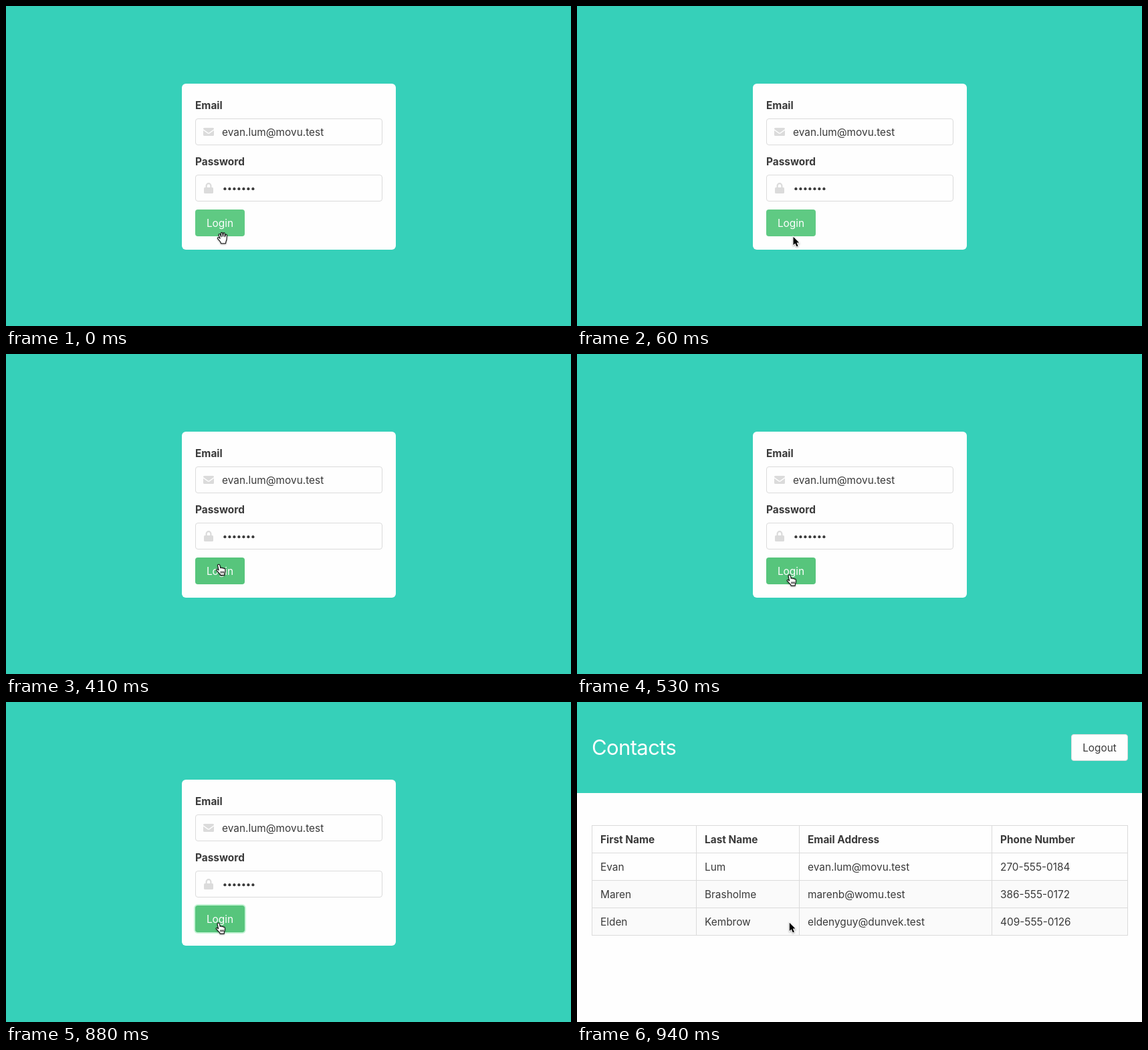
An HTML page that plays this animation: 845 px wide and 478 px high, repeating every 2410 ms.

```html
<!DOCTYPE html>
<html lang="en">
<head>
<meta charset="utf-8">
<title>Login and contacts</title>
<style>
  html, body { margin: 0; width: 100%; height: 100%; overflow: hidden; background: #fefefe; }
  svg { display: block; width: 100%; height: 100%; }
  text { font-family: Inter, Roboto, "Liberation Sans", sans-serif; font-size: 15.4px; fill: #3a3a3a; }
  .bold { font-weight: 700; }
  .mid { text-anchor: middle; }
  .title { font-size: 31px; letter-spacing: -.02em; fill: #fefefe; }
  .box { fill: #fefefe; stroke: #dbdbdb; }
  .icon { fill: #dbdbdb; }
  .hand { fill: #fff; stroke: #111; stroke-width: 1.1; stroke-linejoin: round; }
  .cursor { filter: drop-shadow(0 1px 1px rgba(0, 0, 0, .35)); }
</style>
</head>
<body>
<svg viewBox="0 0 845 478">
  <g id="login">
    <rect width="845" height="478" fill="#36d0b9"/>
    <rect x="263" y="116" width="320" height="248" rx="6" fill="#fefefe"/>
    <text class="bold" x="283" y="154">Email</text>
    <rect class="box" x="283.5" y="168.5" width="279" height="39" rx="3.5"/>
    <path class="icon" d="M296.5 182h13q1.5 0 1.5 1.5v.6l-7 5q-1 .7-2 0l-7-5v-.6q0-1.500 1.500-1.500z
      M295 185.700l6.600 4.700q1.400.9 2.800 0l6.600-4.700v6.800q0 1.500-1.500 1.500h-13q-1.500 0-1.500-1.500z"/>
    <text x="323" y="194">evan.lum@movu.test</text>
    <text class="bold" x="283" y="238">Password</text>
    <rect class="box" x="283.5" y="252.5" width="279" height="39" rx="3.5"/>
    <rect class="icon" x="296" y="271" width="14" height="9" rx="1.5"/>
    <path d="M299.600 272v-3.200a3.400 3.600 0 0 1 6.800 0v3.200" fill="none" stroke="#dbdbdb" stroke-width="2.2"/>
    <g id="dots" fill="#3a3a3a"></g>
    <rect id="ring" x="281" y="302" width="78" height="44" rx="6" fill="#23d160" fill-opacity=".25"/>
    <rect id="button" x="283" y="304" width="74" height="40" rx="4"/>
    <text class="mid" x="320" y="330" style="fill:#fefefe">Login</text>
  </g>
  <g id="contacts">
    <rect width="845" height="478" fill="#fefefe"/>
    <rect width="845" height="136" fill="#36d0b9"/>
    <text class="title" x="22" y="78.500">Contacts</text>
    <rect class="box" x="739.5" y="48.5" width="84" height="39" rx="3.5"/>
    <text class="mid" x="781.5" y="74">Logout</text>
    <g id="table"></g>
  </g>
  <g id="arrow" class="cursor">
    <path d="M0 0V12.200L2.800 9.600L5 14.500L7.100 13.600L5 8.800H8.700Z" fill="#000" stroke="#fff" stroke-width="1.6" paint-order="stroke"/>
  </g>
  <g id="pointer" class="cursor">
    <path class="hand" d="M4 .6C5.200.3 5.900 1.100 6.100 2.200L7 6C7.500 5 9.200 5 9.500 6.300C10.200 5.400 11.600 5.700 11.900 6.900
      C12.900 6.300 14 6.900 14.100 8.200C14.300 10.500 14 12.500 13.100 14L13 16.600H6.800L6.300 15C4.800 13.600 3 11.500 1.200 9.600
      C.3 8.500 1.400 7.400 2.600 8L4.300 9.200L2.800 2.400C2.600 1.400 3 .8 4 .6Z"/>
    <path class="hand" d="M7.700 10.800v3M9.700 10.800v3M11.700 10.800v3"/>
  </g>
  <g id="palm" class="cursor">
    <path class="hand" d="M6 17.200L5.300 15C4 13.400 2.500 11.600 1 9.900C.4 8.600 1.600 7.600 2.800 8.400L4.600 9.800L2.600 4.400
      C2.400 3 4.200 2.500 4.800 3.800L6.400 7.400L6 2C6.100.6 8 .5 8.300 1.900L9 6.800L9.600 2C9.900.8 11.600.9 11.700 2.300
      L11.700 7.200L13 4.200C13.600 3.100 15.100 3.600 14.900 5C14.600 8.600 15 12 13.400 14.600L13 17.200Z"/>
  </g>
</svg>
<script>
const LOOP = 2410;
const $ = id => document.getElementById(id);

function add(parent, tag, attrs, label) {
  const el = document.createElementNS("http://www.w3.org/2000/svg", tag);
  for (const key in attrs) el.setAttribute(key, attrs[key]);
  if (label) el.textContent = label;
  parent.appendChild(el);
}

for (let i = 0; i < 7; i++) add($("dots"), "circle", { cx: 327.4 + 7 * i, cy: 273.2, r: 2.1 });

const rows = [
  ["First Name", "Last Name", "Email Address", "Phone Number"],
  ["Evan", "Lum", "evan.lum@movu.test", "270-555-0184"],
  ["Maren", "Brasholme", "marenb@womu.test", "386-555-0172"],
  ["Elden", "Kembrow", "eldenyguy@dunvek.test", "409-555-0126"]
];
const edges = [22.5, 178.5, 332.5, 620.5, 823.5];
const table = $("table");

add(table, "rect", { x: 22, y: 266, width: 802, height: 82, fill: "#fafafa" });
const grid = edges.map(x => `M${x} 184V349`).join("") +
  edges.map((_, i) => `M22 ${184.5 + 41 * i}H824`).join("");
add(table, "path", { d: grid, stroke: "#dbdbdb", fill: "none" });
rows.forEach((row, r) => row.forEach((cell, c) =>
  add(table, "text", { x: edges[c] + 12.5, y: 211 + 41 * r, class: r ? "" : "bold" }, cell)));

function show(id, on) {
  $(id).style.display = on ? "" : "none";
}

function place(id, x, y) {
  $(id).setAttribute("transform", `translate(${x} ${y})`);
}

function cursor(name, x, y) {
  for (const id of ["arrow", "pointer", "palm"]) show(id, id === name);
  place(name, x, y);
}

function buttonColor(t) {
  if (t < 290) return "#5fca83";
  return t >= 760 && t < 880 ? "#4bc273" : "#57c57c";
}

function draw(t) {
  const done = t >= 940;
  show("login", !done);
  show("contacts", done);
  show("ring", t >= 880);
  $("button").setAttribute("fill", buttonColor(t));

  if (t < 60) cursor("palm", 315.5, 337.5);
  else if (t < 290) cursor("arrow", 323.5, 344.8);
  else if (done) cursor("arrow", 317.8, 329.8);
  else {
    // The hand rises over the label and settles, in 60 ms steps.
    const u = Math.min(4, Math.floor((t - 290) / 60)) / 4;
    cursor("pointer", 314.3 - u, 334 - 4.5 * u - 18 * Math.sin(Math.PI * u));
  }
}

function tick() {
  draw(performance.now() % LOOP);
  requestAnimationFrame(tick);
}
tick();
</script>
</body>
</html>
```
